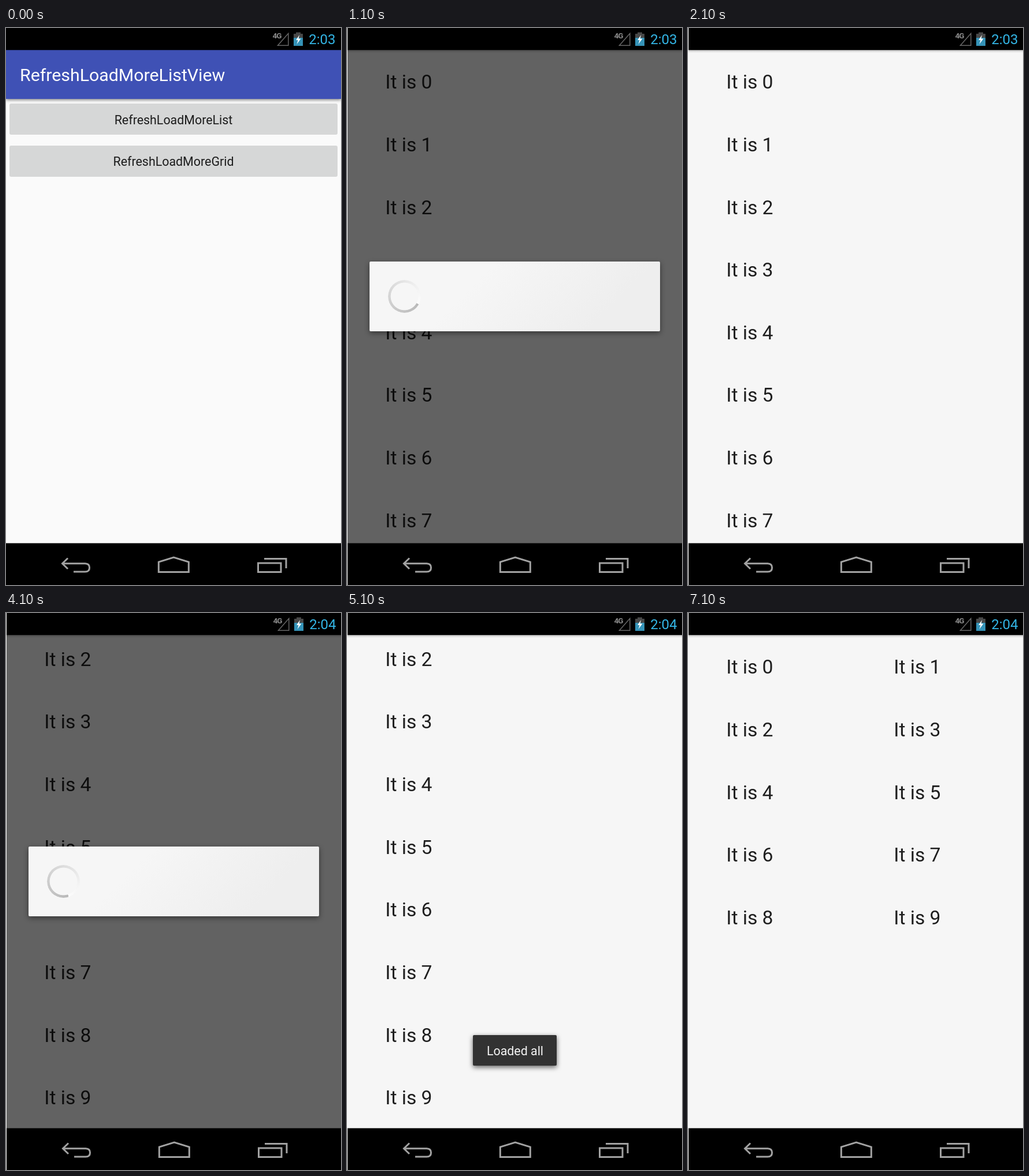
These frames come from a looping animation (580 px wide and 966 px high, 8000 ms). An HTML page:

```html
<!DOCTYPE html>
<html lang="en">
<head>
<meta charset="utf-8">
<title>List and grid demo</title>
<style>
  html, body { margin: 0; width: 100%; height: 100%; overflow: hidden; background: #fff; }
  #phone { position: absolute; width: 580px; height: 966px; overflow: hidden; font-family: Roboto, sans-serif; }
  #phone > * { position: absolute; }
  svg { left: 0; top: 0; }
  .page { left: 0; top: 38px; width: 580px; height: 856px; }
  .home { background: #fafafa; }
  .list { background: linear-gradient(#0003, #0000 5px), #f6f6f6; }
  .bar { left: 0; top: 38px; width: 580px; height: 85px; background: #3f51b5; box-shadow: 0 2px 5px #0007; }
  .button { left: 6px; width: 568px; height: 54px; border-radius: 3px; background: #d6d7d7; }
  .dim { background: #0009; }
  .dialog {
    left: 38px; top: 405px; width: 503px; height: 121px; border-radius: 2px;
    background: linear-gradient(135deg, #f6f6f6 35%, #eee 80%); box-shadow: 0 3px 10px #0007;
  }
  .spinner {
    position: absolute; left: 32px; top: 32px; width: 57px; height: 57px; border-radius: 50%;
    background: conic-gradient(from var(--turn), #b9b9b9, #c9c9c9 25%, #e0e0e0 60%, #f4f4f4 85%, #fcfcfc);
    mask: radial-gradient(circle, #0000 23.5px, #000 24.3px);
    -webkit-mask: radial-gradient(circle, #0000 23.5px, #000 24.3px);
  }
  .toast { left: 217px; top: 732px; width: 145px; height: 53px; border-radius: 2px; background: #323232; box-shadow: 0 3px 9px #0009; }
  .item { font-size: 33.6px; fill: #1e1e1e; }
  .label { font-size: 21.4px; text-anchor: middle; }
</style>
</head>
<body>
<div id="phone"></div>
<script>
const phone = document.getElementById('phone');
const LOOP = 8000;
const ROW = 108.65;

const box = (cls, style = '', inner = '') => `<div class="${cls}" style="${style}">${inner}</div>`;
const svg = inner => `<svg width="580" height="966">${inner}</svg>`;
const text = (x, y, str, attrs) => `<text x="${x}" y="${y}" ${attrs}>${str}</text>`;
const label = (y, str, color) => text(290, y, str, `class="label" fill="${color}"`);

const systemBars = clock => svg(`
  <path d="M0 0H580V38.3H0ZM0 893.5H580V966H0Z"/>
  ${text(461.5, 18, '4G', 'font-size="13.5" font-weight="700" letter-spacing="-1.1" fill="#8a8a8a"')}
  <path d="M470.5 30.3H488.8V9.5Z" fill="none" stroke="#666" stroke-width="1.5"/>
  <path d="M502 7.5H510V10H514V31H498V10H502Z" fill="#484848"/>
  <path d="M498 17H514V31H498Z" fill="#3593b8"/>
  <path d="M508 12L502 21H505.5L503.5 28L510.5 18.5H506.5Z" fill="#fff"/>
  ${text(524.3, 28, clock, 'font-size="24" fill="#33b5e5"')}
  <g fill="none" stroke="#a2a2a2" stroke-width="3">
    <path d="M107 919.5L97.5 928.8L107 938M98 928.8H137Q144.5 929 144.5 936T137 943H117"/>
    <path d="M264.3 943.5V926L290.3 918L316.3 926V943.5Z"/>
    <path d="M436.5 928H476V943.5H436.5ZM447 920.5H485V937"/>
  </g>`);

const home = clock =>
  box('page home') + box('bar') + box('button', 'top:131px') + box('button', 'top:204px') +
  svg(text(24, 92, 'RefreshLoadMoreListView', 'font-size="30.3" fill="#fff"') +
    label(167, 'RefreshLoadMoreList', '#1c1c1c') +
    label(239, 'RefreshLoadMoreGrid', '#1c1c1c')) +
  systemBars(clock);

// Ten items laid out in columns; top is the baseline of the first one.
const items = (top, columns) => box('page list') + svg(
  Array.from({ length: 10 }, (_, i) => text(
    65.3 + i % columns * 290, top + Math.floor(i / columns) * ROW, 'It is ' + i, 'class="item"'
  )).join(''));

const list = (clock, first = 0, overlay = '') =>
  items(first ? 91.6 - first * ROW : 105.2, 1) + overlay + systemBars(clock);
const grid = clock => items(105.2, 2) + systemBars(clock);
const loading = turn => box('page dim') + box('dialog', '', box('spinner', `--turn:${turn}deg`));
const toast = box('toast') + svg(label(767, 'Loaded all', '#f4f4f4'));

// Start time, horizontal offset, contents
const scenes = [
  [0, 0, home('2:03')],
  [100, 1, list('2:03')],
  [1100, 1, list('2:03', 0, loading(119))],
  [2100, 1, list('2:03')],
  [3100, 1, list('2:09', 2)],
  [4100, 1, list('2:04', 2, loading(161))],
  [5100, 1, list('2:04', 2, toast)],
  [6100, 0, home('2:04')],
  [7100, 1, grid('2:04')]
];

let shown;
function draw() {
  const time = performance.now() % LOOP;
  const scene = scenes.findLast(([start]) => start <= time);
  if (scene !== shown) {
    shown = scene;
    phone.style.left = scene[1] + 'px';
    phone.innerHTML = scene[2];
  }
  requestAnimationFrame(draw);
}
draw();
</script>
</body>
</html>
```
